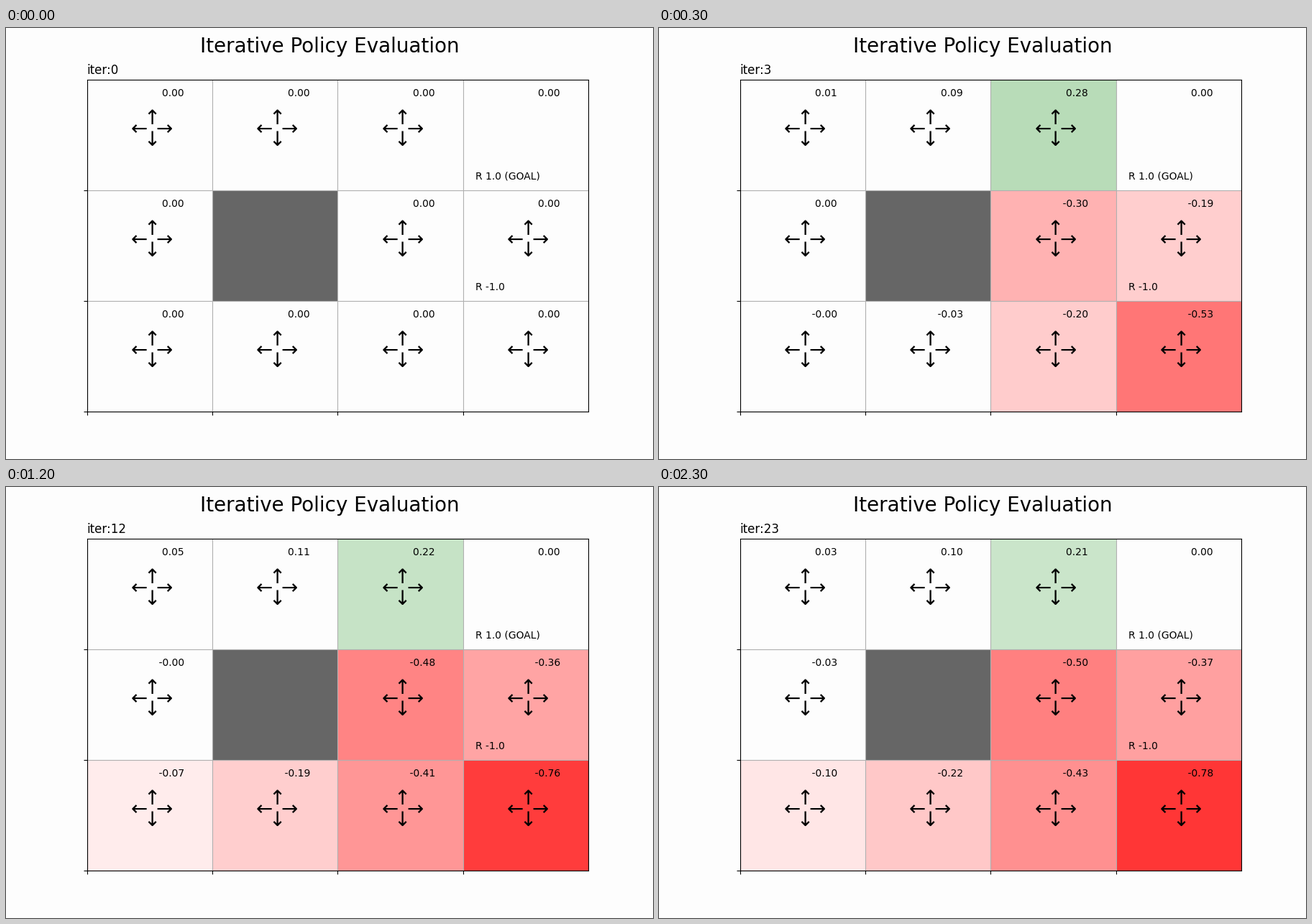
Write a matplotlib script that moves like this. It is 900 px wide and 600 px high and loops after 2.4 s.

```python
import matplotlib.pyplot as plt
import numpy as np
from matplotlib.animation import FuncAnimation
from matplotlib.colors import LinearSegmentedColormap
from matplotlib.patches import Rectangle

ROWS, COLS = 3, 4
GOAL, WALL, PIT = (0, 3), (1, 1), (1, 3)
REWARDS = {GOAL: 1.0, PIT: -1.0}
MOVES = {"↑": (-1, 0), "↓": (1, 0), "←": (0, -1), "→": (0, 1)}
GAMMA = 0.9
STEPS, INTERVAL = 24, 100
PAPER = "#fdfdfd"

CELLS = [(r, c) for r in range(ROWS) for c in range(COLS)]


def step(cell, move):
    """Neighbouring cell, or the same one when blocked."""
    r, c = cell[0] + move[0], cell[1] + move[1]
    inside = 0 <= r < ROWS and 0 <= c < COLS
    return (r, c) if inside and (r, c) != WALL else cell


def sweep(values):
    """One in-place evaluation pass of the uniform random policy."""
    v = values.copy()
    for cell in CELLS:
        if cell in (GOAL, WALL):
            continue
        targets = [step(cell, m) for m in MOVES.values()]
        v[cell] = sum(0.25 * (REWARDS.get(t, 0) + GAMMA * v[t]) for t in targets)
    return v


history = [np.zeros((ROWS, COLS))]
while len(history) < STEPS:
    history.append(sweep(history[-1]))


def shade(v):
    """Values close to zero stay the colour of the paper."""
    return np.ma.masked_inside(np.flipud(v), -0.07, 0.15)


plt.rcParams["font.family"] = "DejaVu Sans"
fig, ax = plt.subplots(figsize=(9, 6), dpi=100, facecolor=PAPER)
ax.set_facecolor(PAPER)
fig.suptitle("Iterative Policy Evaluation", fontsize=20)
title = ax.set_title("iter:0", loc="left", fontsize=12)

cmap = LinearSegmentedColormap.from_list("value", ["red", "white", "green"])
mesh = ax.pcolormesh(shade(history[0]), cmap=cmap, vmin=-1, vmax=1)

ax.set(xticks=range(COLS), yticks=range(ROWS), xlim=(0, COLS), ylim=(0, ROWS))
ax.tick_params(labelbottom=False, labelleft=False)
ax.grid(True)

labels = {}
for cell in CELLS:
    x, y = cell[1], ROWS - cell[0]
    if cell == WALL:
        ax.add_patch(Rectangle((x, y - 1), 1, 1, fc=(0.4, 0.4, 0.4)))
        continue
    labels[cell] = ax.text(x + 0.4, y - 0.15, "", fontsize=10)
    if cell in REWARDS:
        note = f"R {REWARDS[cell]}" + (" (GOAL)" if cell == GOAL else "")
        ax.text(x + 0.1, y - 0.9, note, fontsize=10)
    if cell != GOAL:
        for arrow, (dr, dc) in MOVES.items():
            ax.text(x + 0.45 + 0.1 * dc, y - 0.5 - 0.1 * dr, arrow, fontsize=20)


def update(i):
    v = history[i]
    title.set_text(f"iter:{i}")
    mesh.set_array(shade(v))
    for cell, label in labels.items():
        label.set_text(f"{v[cell]:12.2f}")
    return [title, mesh, *labels.values()]


anim = FuncAnimation(fig, update, frames=STEPS, interval=INTERVAL, repeat=True)
plt.show()
```
